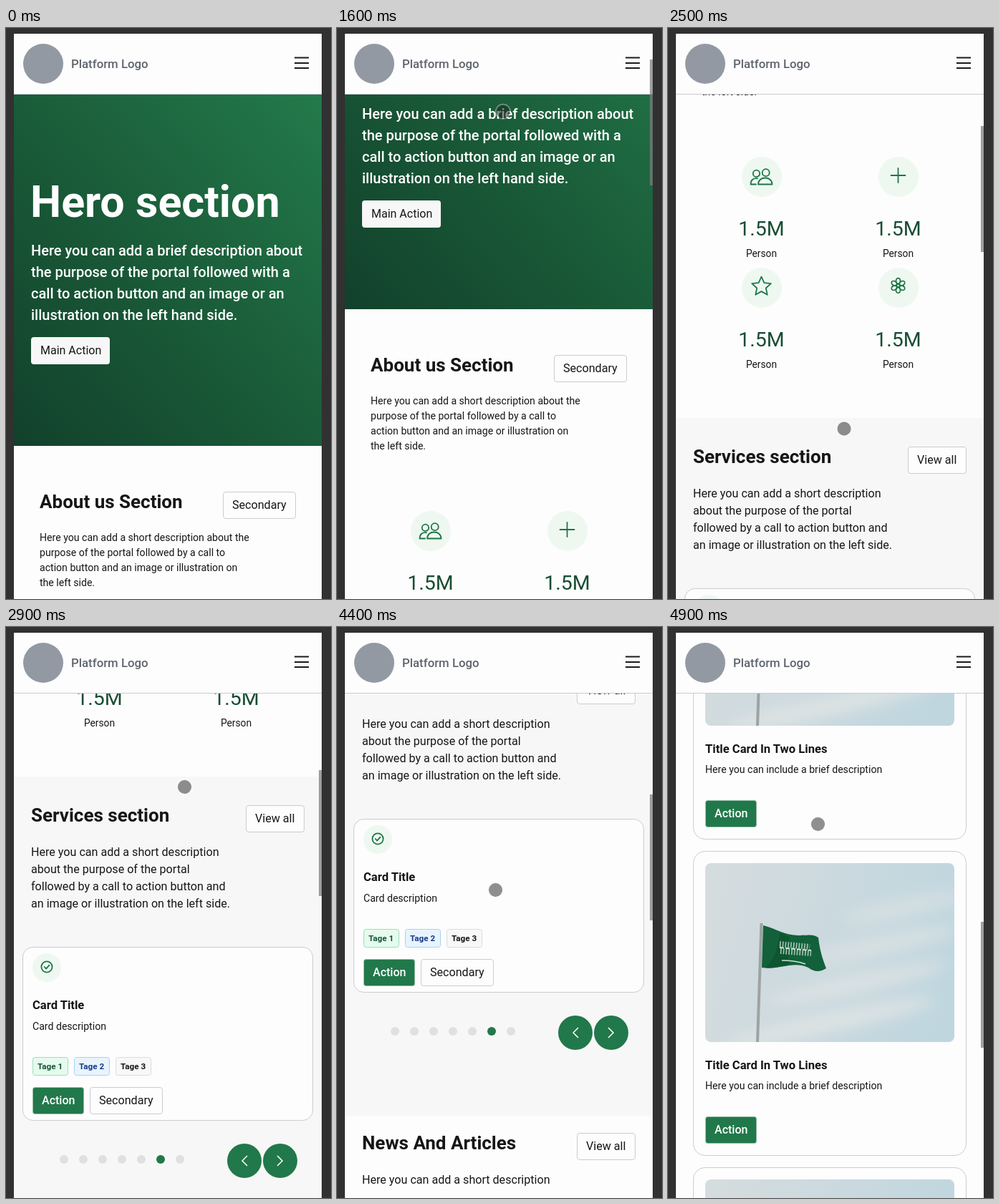
Write an HTML page that moves like this. It is 454x798 px and loops after 5000 ms.

```html
<!DOCTYPE html>
<html lang="en">
<head>
<meta charset="utf-8">
<style>
  html, body { margin: 0; width: 100%; height: 100%; overflow: hidden; background: #313131; }
  svg { display: block; width: 454px; height: 798px; font-family: Roboto, "Open Sans", sans-serif; }
  .line { fill: none; stroke: #1f7547; stroke-width: 1.8; stroke-linejoin: round; stroke-linecap: round; }
</style>
</head>
<body>
<svg id="stage" viewBox="0 0 454 798"></svg>
<script>
const INK = '#161616', GREEN = '#21784a', PAPER = '#fdfdfd', EDGE = '#cbcbd3', MINT = '#eef8f1';

const repeat = (n, make) => Array.from({ length: n }, (_, i) => make(i)).join(' ');
const text = (x, y, str, size, weight = 400, fill = INK, anchor = 'start') =>
  `<text x="${x}" y="${y}" font-size="${size}" font-weight="${weight}" fill="${fill}" text-anchor="${anchor}">${str}</text>`;
const lines = (x, y, step, rows, size, weight, fill) =>
  rows.map((row, i) => text(x, y + i * step, row, size, weight, fill)).join('');
const rect = (x, y, w, h, fill, r = 0, stroke = 'none') =>
  `<rect x="${x}" y="${y}" width="${w}" height="${h}" rx="${r}" fill="${fill}" stroke="${stroke}"/>`;
const box = (x, y, w, h, fill, r, stroke = EDGE) => rect(x + .5, y + .5, w - 1, h - 1, fill, r, stroke);
const dot = (x, y, r, fill) => `<circle cx="${x}" cy="${y}" r="${r}" fill="${fill}"/>`;
const icon = (x, y, body) => `<g class="line" transform="translate(${x} ${y})">${body}</g>`;
const heading = (x, y, str) => text(x, y, str, 26, 700);
const button = (x, y, w, label) => box(x, y, w, 38, PAPER, 3.5) + text(x + 13, y + 24, label, 16.1);
const action = (x, y) => box(x, y, 72, 38, GREEN, 3, '#8fbda4') + text(x + 13, y + 24, 'Action', 16, 500, '#fff');

const hero = rect(11, 93, 430, 491, 'url(#green)')
  + text(34, 264, 'Hero section', 61, 700, '#fff')
  + lines(35, 318, 30, ['Here you can add a brief description about', 'the purpose of the portal followed with a',
    'call to action button and an image or an', 'illustration on the left hand side.'], 20, 500, '#fff')
  + rect(35, 432, 110, 38, '#f7f7f7', 4) + text(48, 456, 'Main Action', 16);

const people = `<circle cx="-7" cy="-4.6" r="4.7"/><circle cx="6.2" cy="-5.8" r="5"/>
  <path d="M-4.5 10.5C-4.5-1.5 15-1.5 15 10.5ZM-7.5 10.5H-15C-15 4-11 1.5-5.5 2.4"/>`;
const plus = '<path d="M-10-2H10M0-12V8"/>';
const star = `<polygon transform="translate(0 -1.5)" points="${repeat(10, i => {
  const r = i % 2 ? 6.6 : 14, a = i * Math.PI / 5;
  return `${r * Math.sin(a)},${-r * Math.cos(a)}`;
})}"/>`;
const flower = `<g transform="translate(0 -3)"><circle r="2.2"/>${
  repeat(6, i => `<ellipse cy="-6.4" rx="3" ry="3.9" transform="rotate(${60 * i})"/>`)}</g>`;

const stat = (body, i) => {
  const x = 130.5 + 191 * (i % 2), y = 894 + 155 * (i >> 1);
  return dot(x + .5, y, 28, MINT) + icon(x, y, body)
    + text(x, y + 82, '1.5M', 28.5, 400, '#174d33', 'middle')
    + text(x, y + 112, 'Person', 13.8, 400, INK, 'middle');
};

const about = heading(47, 671, 'About us Section') + button(303, 648, 102, 'Secondary')
  + lines(47, 717, 21, ['Here you can add a short description about the', 'purpose of the portal followed by a call to',
    'action button and an image or illustration on', 'the left side.'], 14.1)
  + [people, plus, star, flower].map(stat).join('');

const tag = (i, fill, stroke, ink) => box(37 + 58 * i, 1623, 50, 26, fill, 3, stroke)
  + text(44 + 58 * i, 1640, `Tage ${i + 1}`, 11.7, 700, ink);
const arrow = (x, d) => dot(x, 1768, 24, GREEN)
  + `<path d="M${x - 4 * d} 1761l${7 * d} 7l${-7 * d} 7" fill="none" stroke="#fff" stroke-width="1.5"/>`;

const services = rect(11, 1231, 430, 653, '#f7f7f7')
  + heading(35, 1294, 'Services section') + button(335, 1271, 82, 'View all')
  + lines(35, 1342, 24, ['Here you can add a short description', 'about the purpose of the portal',
    'followed by a call to action button and', 'an image or illustration on the left side.'], 16.1)
  + box(23, 1469, 406, 243, PAPER, 14)
  + dot(57, 1498, 20, MINT)
  + icon(57, 1497, '<circle r="7.6"/><path d="M-3.3 0l2.4 2.6L3.4-2.4"/>')
  + text(37, 1556, 'Card Title', 16.6, 700) + text(37, 1585, 'Card description', 14.1)
  + tag(0, '#e6faee', '#9be0b8', '#14573a')
  + tag(1, '#e8f4fd', '#a5d3f2', '#163a8a')
  + tag(2, '#f8f8f9', '#dcdce0', INK)
  + action(37, 1665) + button(117, 1665, 102, 'Secondary')
  + repeat(7, i => dot(81 + 27 * i, 1766, 6, i === 5 ? GREEN : '#e0e0e1'))
  + arrow(333, -1) + arrow(383, 1);

const photo = `<g clip-path="url(#frame)">
  ${rect(0, 0, 348, 250, 'url(#sky)')}
  <g filter="url(#soft)" fill="#e2e5e5">
    ${repeat(4, i => `<ellipse cx="${290 - 45 * i}" cy="${85 + 45 * i}" rx="${90 + 20 * i}" ry="13"
      opacity="${.55 + .1 * i}" transform="rotate(-12 174 125)"/>`)}
  </g>
  <path d="M78.5 84L73 250" stroke="#9da3a2" stroke-width="4"/>
  <path d="M81 87C100 92 112 101 130 101S150 99 158 104C160 122 164 134 169 147C160 153 152 152 144 146C122 136 104 150 79 146Z" fill="#12613a"/>
  <path d="M104 97C102 118 96 136 84 146C94 148 104 144 116 142C118 132 114 120 118 103Z" fill="#0d4f2e" opacity=".6"/>
  <g fill="none" stroke="#d0e0d6">
    <path d="M104 113L146 117M105 123L148 126" stroke-width="8" stroke-dasharray="1.6 2.2" opacity=".8"/>
    <path d="M104 118L148 122" stroke-width="2" stroke-dasharray="6 2"/>
    <path d="M107 136Q126 136 140 141" stroke-width="1.6"/>
  </g></g>`;

const article = y => box(35, y, 382, 426, PAPER, 16)
  + `<g transform="translate(52 ${y + 17})">${photo}</g>`
  + text(52, y + 305, 'Title Card In Two Lines', 16.6, 700)
  + text(52, y + 333, 'Here you can include a brief description', 14.1)
  + action(52, y + 371);

const news = heading(35, 1931, 'News And Articles') + button(335, 1908, 82, 'View all')
  + text(35, 1979, 'Here you can add a short description', 16.1)
  + repeat(3, i => article(2018 + 442 * i));

const header = rect(11, 8, 430, 85, PAPER) + rect(11, 92, 430, 1, EDGE)
  + dot(52, 50, 28, '#9299a3')
  + text(91, 56, 'Platform Logo', 16.8, 500, '#5f646d')
  + '<path d="M403 41.5H423M403 49H423M403 56H423" stroke="#1a1a1a" stroke-width="1.9"/>';

document.getElementById('stage').innerHTML = `
  <defs>
    <linearGradient id="green" x1="0" y1="1" x2="1" y2="0">
      <stop stop-color="#12412b"/><stop offset=".5" stop-color="#1a5c39"/><stop offset="1" stop-color="#237a4b"/>
    </linearGradient>
    <linearGradient id="sky" x1="0" y1=".3" x2="1" y2=".5">
      <stop stop-color="#d5dcde"/><stop offset="1" stop-color="#bfd6df"/>
    </linearGradient>
    <filter id="soft" x="-50%" y="-50%" width="200%" height="200%"><feGaussianBlur stdDeviation="10"/></filter>
    <clipPath id="frame"><rect width="348" height="250" rx="8"/></clipPath>
    <clipPath id="screen"><rect x="11" y="8" width="430" height="790"/></clipPath>
  </defs>
  <g clip-path="url(#screen)">
    ${rect(11, 8, 430, 790, PAPER)}
    <g id="page">${hero + about + services + news}</g>
    ${header}
    <rect id="thumb" x="437" width="4" height="176" fill="#7c7c7c"/>
    <g id="touch"><circle r="9.7" fill="#222" fill-opacity=".5"/>
      <circle r="10.2" fill="none" stroke="#fff" stroke-opacity=".35" stroke-width="1.6"/></g>
  </g>`;

const span = (t, from, to) => Math.min(1, Math.max(0, (t - from) / (to - from)));
const easeIn = f => f ** 3;
const easeOut = f => 1 - (1 - f) ** 3;
const easeInOut = f => f * f * (3 - 2 * f);

// Four swipes; each adds its own eased distance.
const swipes = [
  { from: 1160, to: 1510, by: 191, ease: easeOut },
  { from: 1800, to: 2600, by: 496, ease: easeOut },
  { from: 2600, to: 3540, by: 490, ease: easeOut },
  { from: 4195, to: 4900, by: 970, ease: easeIn },
];
const scrollAt = t => Math.round(swipes.reduce((sum, s) => sum + s.by * s.ease(span(t, s.from, s.to)), 0));

// Turning points of the finger: time, x, y.
const turns = [[700, 440, 335], [1100, 236, 308], [1500, 232, 117], [2000, 231.5, 115.5], [2500, 246, 560],
  [2900, 249.5, 223.5], [3600, 214.5, 465.5], [4400, 221.5, 367.5], [4900, 209.5, 275.5]];
function touchAt(t) {
  const i = Math.max(1, turns.findIndex(p => p[0] >= t));
  const [a, b] = [turns[i - 1], turns[i]];
  const f = easeInOut(span(t, a[0], b[0]));
  return [1, 2].map(k => a[k] + (b[k] - a[k]) * f);
}

// The scrollbar shows while the page moves and fades when it rests.
const barAt = t => span(t, 1100, 1200) - span(t, 3900, 4200) + span(t, 4200, 4300);

const [page, thumb, touch] = ['page', 'thumb', 'touch'].map(id => document.getElementById(id));

function draw(now) {
  const t = Math.floor(now % 5000 / 100) * 100;
  const scroll = scrollAt(t);
  page.setAttribute('transform', `translate(0 ${-scroll})`);
  thumb.setAttribute('y', Math.round(8 + scroll * .188));
  thumb.setAttribute('opacity', .72 * barAt(t));
  touch.setAttribute('transform', `translate(${touchAt(t)})`);
  touch.setAttribute('opacity', t < 700 ? 0 : 1);
}

const start = performance.now();
function tick() {
  draw(performance.now() - start);
  requestAnimationFrame(tick);
}
tick();
</script>
</body>
</html>
```
